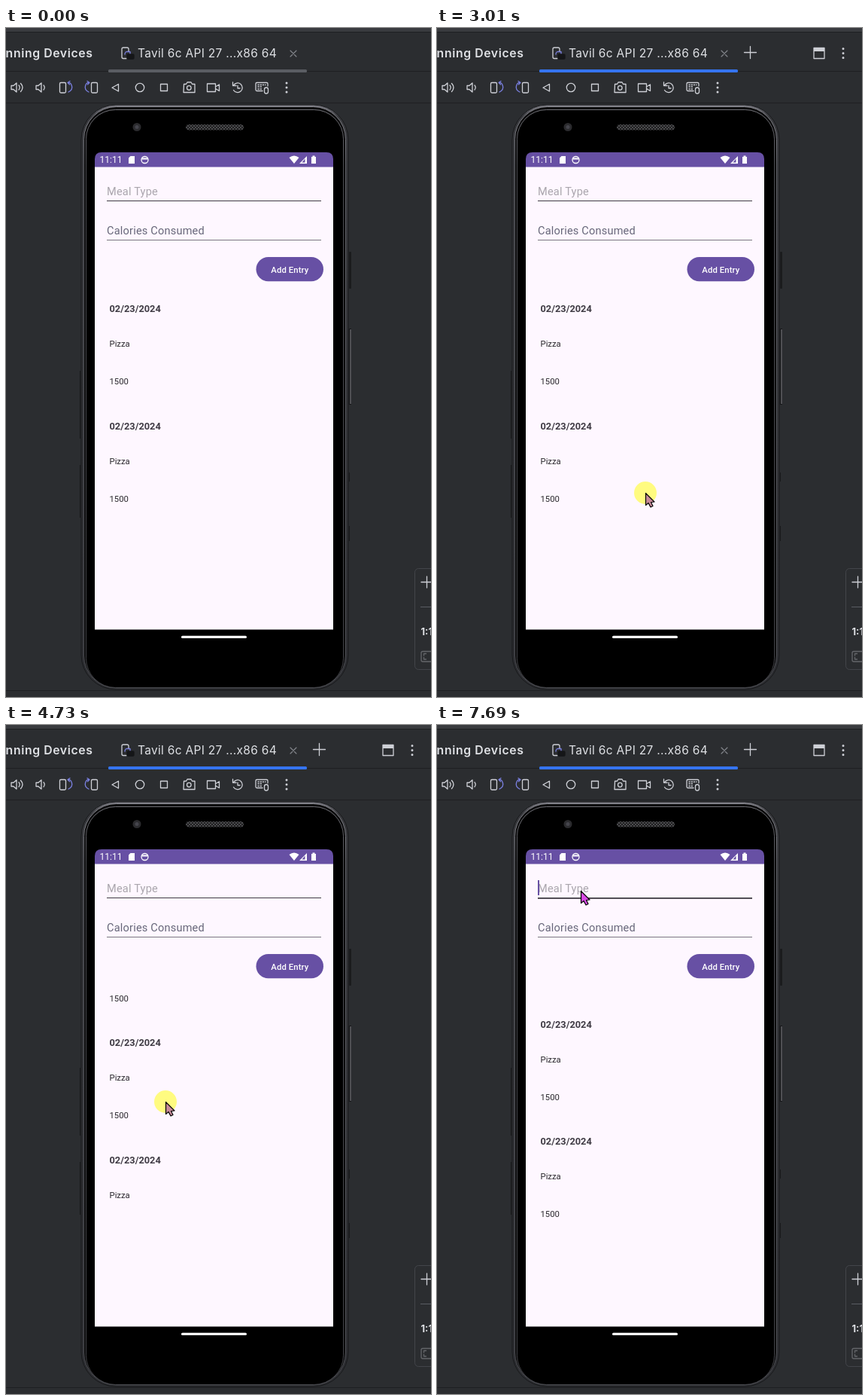
These frames come from a looping animation (565x888 px, 8000 ms). An HTML page:

```html
<!DOCTYPE html>
<html lang="en">
<head>
<meta charset="utf-8">
<title>Meal log demo</title>
<style>
  html, body { margin: 0; width: 100%; height: 100%; overflow: hidden; background: #2b2d30; }
  svg { display: block; width: 565px; height: 888px; }
  .ide { font-family: Inter, sans-serif; fill: #dfe1e5; }
  .app { font-family: Roboto, sans-serif; }
  .icon { fill: none; stroke: #ced0d6; stroke-width: 1.3; stroke-linecap: round; stroke-linejoin: round; }
  .solid { fill: #ced0d6; stroke: none; }
  .blue { stroke: #7a80e0; }
  .hint { font-size: 14.55px; letter-spacing: .2px; }
  .date { font-size: 12.8px; font-weight: 700; fill: #403c45; }
  .row { font-size: 11.3px; fill: #29272c; }
</style>
</head>
<body>
<svg viewBox="0 0 565 888">
  <defs>
    <linearGradient id="rim" x2="0" y2="1">
      <stop offset="0" stop-color="#77777f"/>
      <stop offset=".02" stop-color="#38393d"/>
      <stop offset="1" stop-color="#2c2d31"/>
    </linearGradient>
    <linearGradient id="edge" x2="0" y2="1">
      <stop offset="0" stop-color="#8b8b92"/>
      <stop offset=".1" stop-color="#5c5d63"/>
      <stop offset="1" stop-color="#4c4d52"/>
    </linearGradient>
    <pattern id="mesh" width="4" height="4" patternUnits="userSpaceOnUse">
      <rect width="4" height="4" fill="#1d1d1e"/>
      <path d="M0 0l4 4M4 0l-4 4" stroke="#57575a" stroke-width=".8"/>
    </pattern>
    <clipPath id="listClip"><rect x="118" y="357" width="317" height="298"/></clipPath>
  </defs>

  <!-- IDE chrome -->
  <rect width="565" height="888" fill="#2b2d30"/>
  <rect width="565" height="5" fill="#393b3f"/>
  <path d="M0 5.5H565M0 57.5H565M0 99.5H565M0 879.5H565" stroke="#1e1f22"/>
  <rect id="tabLine" x="136" y="55" width="264" height="4" rx="1.5"/>
  <g class="ide">
    <text x="115.5" y="39" text-anchor="end" font-size="15.8" font-weight="600" letter-spacing=".6">Running Devices</text>
    <text x="175" y="39" font-size="15.5" letter-spacing=".3">Tavil 6c API 27 ...x86 64</text>
  </g>
  <g class="icon">
    <path d="M160 40.5H156Q154 40.5 154 38.5V28Q154 26 156 26H161Q163 26 163 28V31"/>
    <path class="blue" d="M158 35q0-4 4-3.500m0 0h3v4"/>
    <rect x="161" y="35" width="9" height="6" rx="1" fill="#151618" stroke="#151618"/>
    <path d="M378 30l8 8M386 30l-8 8" stroke="#85888e" stroke-width="1.1"/>
  </g>
  <g id="hoverIcons" class="icon">
    <path d="M408.500 32.500H424.500M416.500 24.500V40.500"/>
    <rect x="501" y="26.500" width="14" height="14"/>
    <path class="solid" d="M501 26h14v5h-14z"/>
    <path d="M540 27.500v0M540 33.500v0M540 39.500v0" stroke-width="3"/>
  </g>

  <!-- Emulator toolbar -->
  <g class="icon">
    <g id="speaker"><path d="M7 76.500h3l4-3.500v12l-4-3.500H7zM17 76q2.500 3 0 6"/></g>
    <path d="M19.500 73.500q5 5.500 0 11"/>
    <use href="#speaker" x="33"/>
    <g id="rotate">
      <rect x="71.500" y="72.500" width="8" height="13.500" rx="1.500"/>
      <path class="blue" d="M83 85q6-3 4.500-8t-5-4.500m2.500-2l-3 2 2.500 2.500"/>
    </g>
    <use href="#rotate" transform="matrix(-1 0 0 1 193 0)"/>
    <path d="M149.500 74.500v9.500l-8.500-4.750zM205.500 74.500h9v9h-9z"/>
    <circle cx="178" cy="79" r="5.700"/>
    <path d="M236.500 74.500h3l1.500-2.500h5l1.500 2.500h3.500v11h-15z"/>
    <circle cx="243.300" cy="79.500" r="2.800"/>
    <path d="M267.500 74h11v10.500h-11zM278.500 78l5-3v8.500l-5-3"/>
    <path d="M302.500 76a6.300 6.300 0 1 1 0 6.500M301.500 72v4.500h4.500M308 76.500v3.500h3"/>
    <path d="M341 83.500h-7.500q-1.500 0-1.500-1.500v-8q0-1.500 1.500-1.500h13q1.500 0 1.500 1.500v3"/>
    <path d="M335 75.500h10M335 78h6M335 81h5" stroke-dasharray="1.2 2"/>
    <rect x="343.500" y="79" width="5" height="8" rx="2.500"/>
    <path d="M373 73v0M373 79v0M373 85v0" stroke-width="3"/>
  </g>

  <!-- Phone -->
  <rect x="100" y="102" width="355" height="776" rx="46" fill="url(#rim)" stroke="#18191b"/>
  <rect x="103.500" y="104.500" width="348" height="771.500" rx="43" fill="#0b0b0c" stroke="url(#edge)"/>
  <rect x="106.500" y="108.500" width="342" height="767" rx="39" fill="#000" stroke="url(#edge)" stroke-width=".8"/>
  <path d="M145 103.500H410" stroke="#77777f"/>
  <path d="M98.500 455v90M98.500 580v70M456.500 590v12M456.500 661v20" stroke="#18191b"/>
  <rect x="456" y="297" width="3" height="49" rx="1" fill="#1a1b1d"/>
  <path d="M457.500 399V500" stroke="#151618" stroke-width="3"/>
  <path d="M458 400V499" stroke="#77787c" stroke-width="1.200"/>
  <circle cx="174" cy="131.500" r="5.500" fill="#2b2b2e"/>
  <circle cx="174" cy="131.500" r="2.500" fill="#45454c"/>
  <rect x="239" y="128" width="77" height="7.500" rx="3.700" fill="url(#mesh)"/>
  <rect x="233" y="806.800" width="87" height="3.200" rx="1.600" fill="#fff"/>

  <!-- App screen -->
  <path d="M118 798.500V184H435V798.500z" fill="#fef7ff"/>
  <path d="M118 184.400V174q0-9 9-9H426q9 0 9 9V184.400z" fill="#6750a4"/>
  <g class="app">
    <text x="124.500" y="179" font-size="12" fill="#fff">11:11</text>
    <g fill="#fff">
      <path d="M165.500 170h5.500v10h-8v-7.500z"/>
      <path d="M376.500 172q6.500-5 13 0l-6.500 8zM400 170v10h-10z"/>
      <path d="M407.500 169.500h3v1.500h1.500v9h-6v-9h1.500z"/>
      <path d="M393.500 178.500h4v-5z" fill="#6750a4"/>
    </g>
    <circle cx="184.500" cy="175" r="4.500" fill="none" stroke="#fff" stroke-width="1.300"/>
    <path d="M181 173.500h7" stroke="#fff" stroke-width="2"/>
    <text class="hint" x="134" y="222" fill="#aaa6ad">Meal Type</text>
    <text class="hint" x="134" y="273.700" fill="#67677a">Calories Consumed</text>
    <rect id="focusLine" x="134" y="229" width="285" height="1" fill="#3f3b43"/>
    <rect x="134" y="281" width="285" height="1" fill="#7b7781"/>
    <rect id="caret" x="134" y="206" width="2" height="20" fill="#6750a4"/>
    <rect x="332.500" y="304" width="89.500" height="32.300" rx="16.150" fill="#6750a4"/>
    <text x="377.300" y="325" font-size="11.300" font-weight="500" letter-spacing=".1" text-anchor="middle" fill="#fff">Add Entry</text>
    <g clip-path="url(#listClip)"><g id="list"></g></g>
  </g>

  <!-- Zoom panel -->
  <rect x="543.500" y="717.500" width="40" height="134" rx="5" fill="#2b2d30" stroke="#43454a"/>
  <path class="icon" d="M552 735.500h15M559.500 728v15"/>
  <path d="M551 768.500h14" stroke="#5a5d63"/>
  <text class="ide" x="551.500" y="805.500" font-size="13" font-weight="700">1:1</text>
  <g class="icon" opacity=".35">
    <rect x="552" y="827.500" width="18" height="13.500" rx="2"/>
    <path d="M555.500 833v-2.500h3M555.500 835.500v2.500h3"/>
  </g>

  <g id="pointer">
    <circle id="press" r="15" fill="#fffb80"/>
    <path id="arrow" d="M.5 .5V16.500L4 13.500L7 19L10 17.500L7.500 12.500L12 12z" stroke="#000" stroke-width="1.200" stroke-linejoin="round"/>
  </g>
</svg>

<script>
const LOOP = 8000, TICK = 70, BLINK = 530, PERIOD = 155.5;
const ENTER = 240, ACTIVATE = 3010, FOCUS = 6170;
const $ = id => document.getElementById(id);

const easeIn = k => k ** 1.5;
const easeOut = k => 1 - (1 - k) ** 2;

// Each gesture glides from the previous state to its own x, y and list scroll.
const origin = { x: 354, y: 890, scroll: 0 };
const gestures = [
  { from: ENTER, to: 790, x: 319, y: 671, scroll: 0, ease: easeOut },
  { from: 1250, to: 1660, x: 277, y: 617, scroll: 0, ease: easeOut },
  { from: 3240, to: 3520, x: 266, y: 533, scroll: 46.5, ease: easeIn },
  { from: 3520, to: 3990, x: 252, y: 505, scroll: 106.5, ease: easeOut },
  { from: 4060, to: 4460, x: 212, y: 500, scroll: 106.5, ease: easeOut },
  { from: 4730, to: 5080, x: 200, y: 366, scroll: 238, ease: easeIn },
  { from: 5080, to: 5480, x: 196, y: 308, scroll: 286.5, ease: easeOut },
  { from: 5540, to: 5900, x: 191, y: 220, scroll: 286.5, ease: easeOut }
];
const presses = [[ACTIVATE, 3920], [4730, 5310], [6030, FOCUS]];

function stateAt(t) {
  let state = origin;
  for (const g of gestures) {
    if (t < g.from) break;
    const elapsed = Math.floor((t - g.from) / TICK) * TICK;
    const k = t >= g.to ? 1 : g.ease(elapsed / (g.to - g.from));
    const mix = key => state[key] + (g[key] - state[key]) * k;
    state = { x: mix('x'), y: mix('y'), scroll: mix('scroll') };
  }
  return state;
}

const show = (id, on) => $(id).setAttribute('visibility', on ? 'visible' : 'hidden');
const line = (cls, y, text) => `<text class="${cls}" x="137.5" y="${y}">${text}</text>`;

$('list').innerHTML = [0, 1, 2, 3].map(i => {
  const y = i * PERIOD;
  return line('date', y + 377, '02/23/2024') + line('row', y + 423, 'Pizza') + line('row', y + 473, '1500');
}).join('');

function render(t) {
  const { x, y, scroll } = stateAt(t);
  const pressed = presses.some(([from, to]) => t >= from && t < to);
  $('pointer').setAttribute('transform', `translate(${Math.round(x)} ${Math.round(y)})`);
  $('list').setAttribute('transform', `translate(0 ${-scroll})`);
  $('arrow').setAttribute('fill', pressed ? '#c78a9a' : '#d94be6');
  $('tabLine').setAttribute('fill', t < ACTIVATE ? '#5a5d63' : '#3574f0');
  $('focusLine').setAttribute('height', t < FOCUS ? 1 : 1.8);
  show('hoverIcons', t >= ENTER);
  show('arrow', t >= ENTER);
  show('press', pressed);
  show('caret', t >= FOCUS && (t - FOCUS) % (2 * BLINK) < BLINK);
}

const start = performance.now();
function frame() {
  render((performance.now() - start) % LOOP);
  requestAnimationFrame(frame);
}
frame();
</script>
</body>
</html>
```
